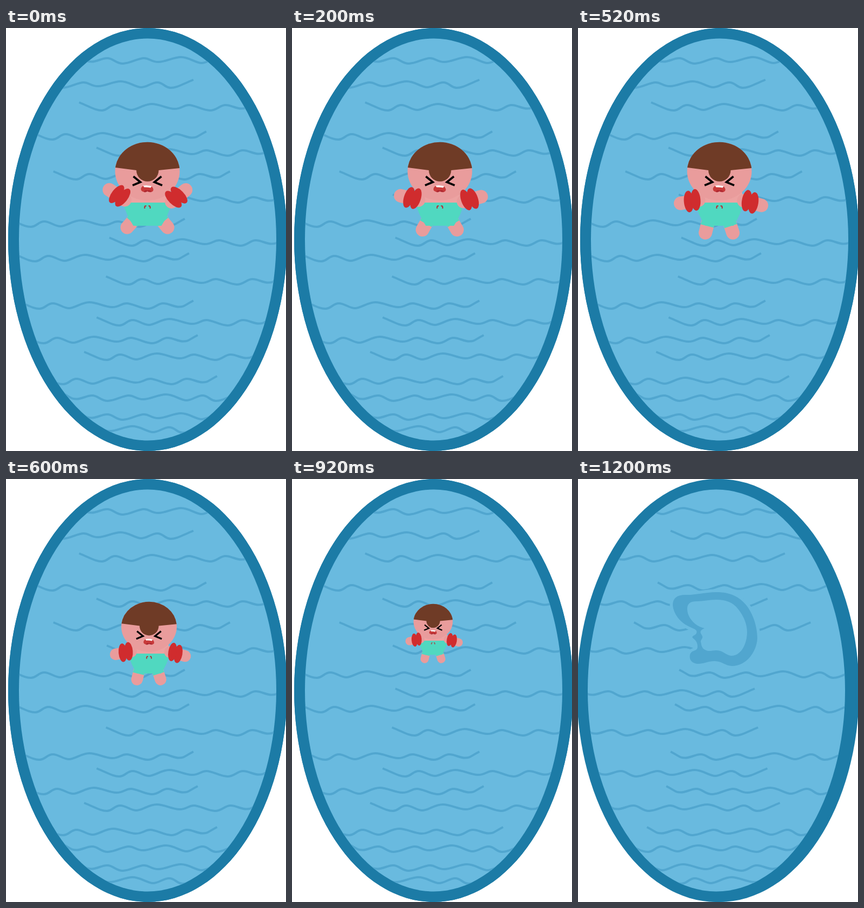
Recreate the animation shown at these times as an HTML page. Size 520 px wide and 785 px high, loop 1.4 s.

```html
<!DOCTYPE html>
<html lang="en">
<head>
<meta charset="utf-8">
<title>Pool</title>
<style>
  html, body { margin: 0; width: 100%; height: 100%; overflow: hidden; background: #fff; }
  svg { display: block; width: 100%; height: 100%; }
</style>
</head>
<body>
<svg viewBox="0 0 520 785">
  <defs>
    <clipPath id="water"><ellipse cx="263" cy="392.5" rx="239" ry="373"/></clipPath>
    <ellipse id="edge" cx="263" cy="392.5" rx="259" ry="392.5" fill="#1c7ba6"/>
    <path id="wave" d="M0 0C22 9 31 15 42 15S56 5 67 5 86 14 97 14 120 3 135 3 163 12 177 12 193 5 204 5 230 15 243 15 261 5 272 5 290 11.5 301 11.5 312 8 328 0"/>
    <g id="arm">
      <path d="M-22 3L12 0" stroke="#e99c9c" stroke-width="25" stroke-linecap="round"/>
      <g fill="#d02c2e">
        <ellipse cx="-6.5" cy="1" rx="9" ry="20"/>
        <ellipse cx="6.5" cy="-1" rx="9" ry="20"/>
      </g>
    </g>
    <g id="leg">
      <path d="M0 0V-18" stroke="#e99c9c" stroke-width="25" stroke-linecap="round"/>
      <path d="M-12.5 -13H12.5L11 -27H-11Z" fill="#50d8c0"/>
    </g>
  </defs>

  <use href="#edge"/>
  <g id="pool">
    <use href="#edge"/>
    <ellipse cx="263" cy="392.5" rx="239" ry="373" fill="#69badf"/>
    <g id="waves" clip-path="url(#water)" fill="none" stroke="#51a6cf" stroke-width="4"/>
  </g>

  <g id="splash">
    <path id="rim" fill="#69badf" stroke="#69badf" stroke-width="11" d="M176 234C176 221 184 215 199 215C216 216 235 210 258 210C282 210 300 218 314 236C327 254 333 277 333 296C332 319 314 347 286 347C274 347 268 338 253 338C242 338 234 343 222 343C211 342 206 335 208 326C211 316 222 321 222 311C222 302 217 298 213 295C210 291 219 290 220 286C222 281 218 279 211 276C190 268 177 250 176 234Z"/>
    <path id="ring" fill="#51a6cf" fill-rule="evenodd"/>
  </g>

  <g id="boy" fill="none">
    <use id="legL" href="#leg"/>
    <use id="legR" href="#leg"/>
    <path fill="#eca3a2" d="M222 298H303L307 325H217Z"/>
    <path fill="#50d8c0" d="M217 324H307Q302 346 288 367H236Q222 346 217 324Z"/>
    <path stroke="#b52a32" stroke-width="2" d="M257 335Q256 329 260 330.500M267 335Q268 329 264 330.500"/>
    <ellipse cx="262" cy="266" rx="60" ry="54" fill="#e99c9c"/>
    <use id="armL" href="#arm"/>
    <use id="armR" href="#arm"/>
    <path fill="#6f3b26" d="M202.500 259A60 54 0 0 1 321.700 260L283 264A20.500 20.500 0 0 1 241.500 264Z"/>
    <path stroke="#000" stroke-width="3.800" d="M236 275.500L249 286 234.500 292M288 275.500L275 286 289.500 292"/>
    <path fill="#c83a3a" d="M254 293Q262 291 270 294Q275 299 272 303Q267 306 262 303Q256 306 251 302Q248 297 254 293Z"/>
    <path fill="#ad2630" d="M255 304Q258 299 262 302Q266 299 270 304Q266 305 262 303Q258 306 255 304Z"/>
    <path fill="#fff" d="M254 292.500Q262 291 270 293.500L268 296.500Q262 295 256 295.500Z"/>
  </g>
</svg>
<script>
const $ = id => document.getElementById(id);
const move = (id, value) => $(id).setAttribute('transform', value);
const show = (id, on) => $(id).setAttribute('visibility', on ? 'visible' : 'hidden');

// Waves cut off by the right rim start along a curve; the others have a free right end
const wave = (x, y, side = 1) =>
  `<use href="#wave" transform="translate(${x} ${y}) scale(${side} 1)"/>`;
const startX = y => 192 - 0.00096 * (y - 380) ** 2;
const rightRows = [138, 222, 309, 389, 461, 537, 601].map(y => wave(startX(y), y));
const leftRows = [[372, 192], [416, 266], [332, 354], [340, 418], [348, 506], [356, 570], [392, 646]]
  .map(([end, y]) => wave(end - 328, y));
const mirroredRows = [[460, 51], [348, 96], [432, 677], [460, 712], [370, 736]]
  .map(([end, y]) => wave(end, y, -1));
$('waves').innerHTML = [...rightRows, ...leftRows, ...mirroredRows].join('');

const hole = 'M203 243C202 232 208 227 220 227C234 227 244 224 258 224C274 224 288 229 297 241C307 253 314 269 314 284C314 307 302 329 284 328C275 327 269 318 258 318C249 318 243 321 236 317C229 314 229 306 228 302C228 298 232 296 231 292C230 288 226 286 228 282C230 279 233 278 235 277C219 274 204 259 203 243Z';
$('ring').setAttribute('d', $('rim').getAttribute('d') + hole);

// Limbs swing from raised to lowered: x, y, angle
const limbs = {
  armL: { up: [210.5, 311.5, 38], down: [211.5, 320.5, -5] },
  armR: { up: [315.5, 314, 45], down: [319, 322.5, -10], flip: 'scale(-1 1)' },
  legL: { up: [224.5, 370, 42], down: [236, 380, 14] },
  legR: { up: [299.5, 370, -40], down: [287, 380, -18] }
};

// The boy splashes, then shrinks away
const steps = [
  { swing: 0, x: 262, y: 212, size: 1 },
  { swing: 0.45, x: 274, y: 212, size: 1 },
  { swing: 1, x: 262, y: 212, size: 1 },
  { swing: 1, x: 265, y: 228, size: 0.858 },
  { swing: 1, x: 261.5, y: 232, size: 0.608 }
];

function pose({ swing, x, y, size }) {
  move('boy', `translate(${x + 0.6} ${y}) scale(${size}) translate(-262 -212)`);
  for (const [id, { up, down, flip = '' }] of Object.entries(limbs)) {
    const [px, py, turn] = up.map((v, i) => v + (down[i] - v) * swing);
    move(id, `translate(${px} ${py}) ${flip} rotate(${turn})`);
  }
}

function draw(now) {
  const n = Math.floor(now % 1400 / 200);
  const step = steps[n];
  show('boy', step);
  show('splash', !step);
  move('pool', n === 6 ? 'translate(520) scale(-1 1)' : '');
  if (step) pose(step);
  requestAnimationFrame(draw);
}
draw(performance.now());
</script>
</body>
</html>
```
